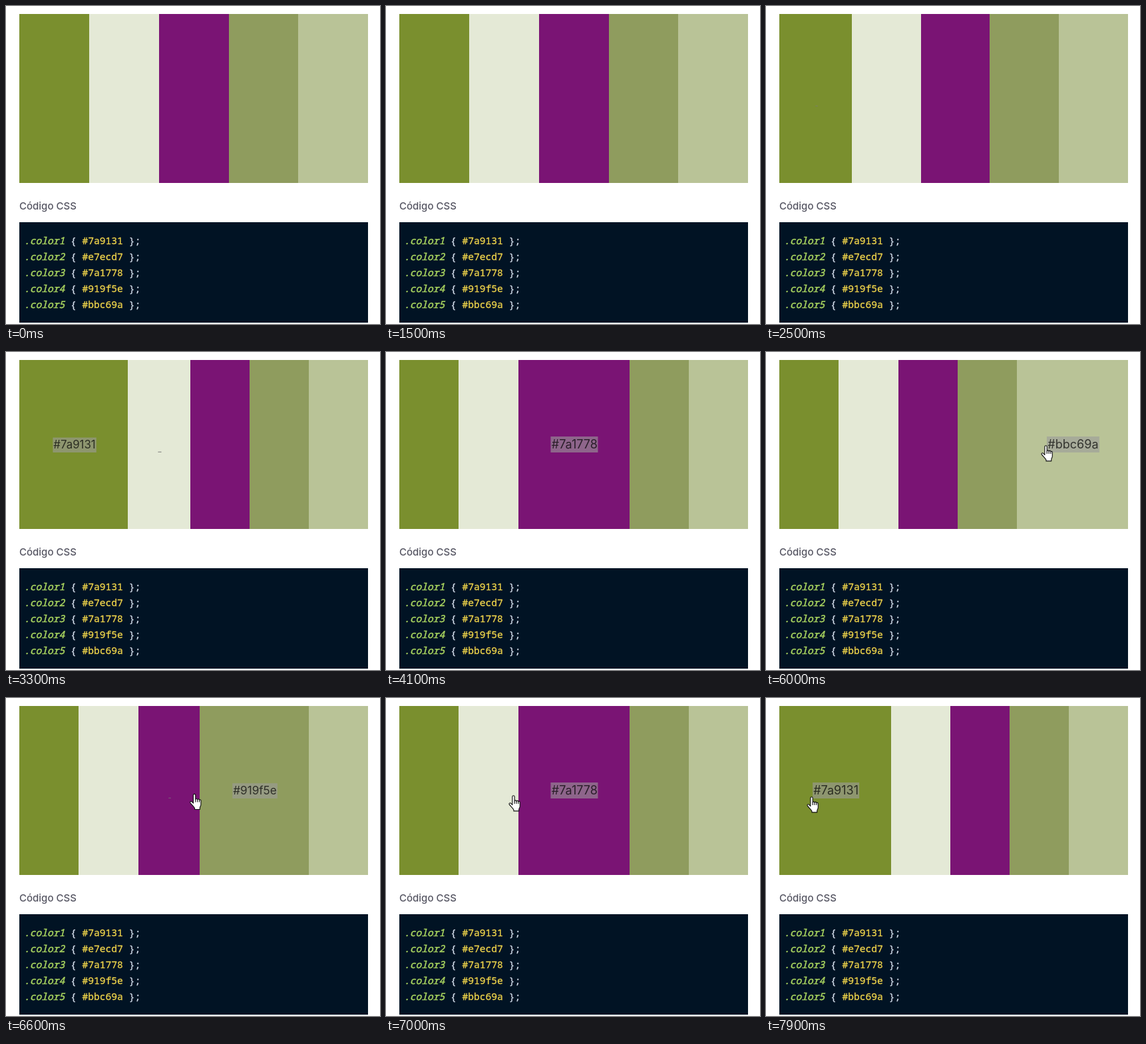
Write an HTML page that moves like this. It is 562x478 px and loops after 8 s.

```html
<!DOCTYPE html>
<html lang="es">
<head>
<meta charset="utf-8">
<style>
html, body { margin: 0; width: 100%; height: 100%; overflow: hidden; background: #fff; }
body { position: relative; }
body > * { position: absolute; }
#palette { left: 20.4px; top: 12px; width: 523.8px; height: 254px; display: flex; }
#palette div { flex: 1 1 0; min-width: 0; position: relative; }
#palette span { position: absolute; left: 50%; bottom: 115.5px; margin-left: 1px; padding: 0 1px;
  font: 18px/24px Inter, sans-serif; white-space: nowrap; color: rgba(0, 0, 0, .7);
  background: rgba(156, 156, 156, .6); transform-origin: 50% 100%; }
h2 { left: 20px; top: 289px; margin: 0; font: 500 15px/24px Inter, sans-serif; color: #555562; }
pre { left: 20px; top: 325px; width: 517px; height: 136px; margin: 0; padding: 15px 0 0 7px;
  font: 14.6px/24px "Noto Sans Mono", monospace; color: #d6deeb; background: #011324;
  -webkit-text-stroke: .3px; }
pre i { color: #a8d35f; -webkit-text-stroke: .5px; }
pre b { color: #f3d64b; font-weight: normal; }
#hand { left: 0; top: 0; fill: #fff; stroke: #111; stroke-width: 1.1; stroke-linejoin: round; }
</style>
</head>
<body>
<div id="palette"></div>
<h2>Código CSS</h2>
<pre></pre>
<svg id="hand" width="19" height="26" viewBox="0 0 18 25">
  <path d="M5.5 14V2.3a1.6 1.6 0 0 1 3.2 0V8.5a1.5 1.5 0 0 1 2.8.2a1.5 1.5 0 0 1 2.7.6a1.4 1.4 0 0 1 2.3 1.2V16c0 2-1.5 3-1.5 5V23H7.5V21.2C6 18.5 3.5 16.5 1.2 13.6C.2 12 2 10.6 3.4 11.8Z"/>
  <path d="M8.7 8.5V12.5M11.5 8.7V12.5M14.2 9.3V12.5"/>
</svg>
<script>
const LOOP = 8000, TICK = 100, EASE_MS = 200, GROW = 0.88;
const codes = ['#7a9131', '#e7ecd7', '#7a1778', '#919f5e', '#bbc69a'];
const fills = ['#7a8f2e', '#e4e9d6', '#7a1474', '#8f9c5e', '#b9c397'];
// [start time, panel that opens]
const opens = [[2487, 0], [3284, 1], [3887, 2], [4387, 3], [5087, 4],
  [6187, 3], [6587, 2], [7020, 1], [7587, 0]];
// [time, x, y]
const path = [[5800, 447, 145], [6000, 413, 140], [7000, 184, 146], [7900, 61, 148]];

const hand = document.getElementById('hand');
const palette = document.getElementById('palette');
document.querySelector('pre').innerHTML =
  codes.map((c, i) => `<i>.color${i + 1}</i> { <b>${c}</b> };`).join('\n');
palette.innerHTML = codes.map((c, i) =>
  `<div style="background:${fills[i]}"><span>${c}</span></div>`).join('');
const panels = [...palette.children];

const clamp = v => Math.min(1, Math.max(0, v));

// CSS "ease" curve: cubic-bezier(.25, .1, .25, 1)
function ease(x) {
  const bez = (a, b, s) => 3 * a * s * (1 - s) ** 2 + 3 * b * s * s * (1 - s) + s ** 3;
  let lo = 0, hi = 1;
  for (let n = 0; n < 20; n++) {
    const mid = (lo + hi) / 2;
    if (bez(.25, .25, mid) < x) lo = mid; else hi = mid;
  }
  return bez(.1, 1, hi);
}

function openness(t) {
  const open = [0, 0, 0, 0, 0];
  const k = opens.filter(o => o[0] <= t).length - 1;
  if (k < 0) return open;
  const x = clamp((t - opens[k][0]) / EASE_MS);
  const p = x < 1 ? ease(x) : 1;
  if (k > 0) open[opens[k - 1][1]] = 1 - p;
  open[opens[k][1]] = p;
  return open;
}

function moveHand(t) {
  hand.style.visibility = t < path[0][0] ? 'hidden' : 'visible';
  const k = Math.max(1, path.findIndex(p => p[0] >= t));
  const [t0, x0, y0] = path[k - 1], [t1, x1, y1] = path[k];
  const p = clamp((t - t0) / (t1 - t0));
  hand.style.transform = `translate(${x0 + (x1 - x0) * p}px, ${y0 + (y1 - y0) * p}px)`;
}

function draw(t) {
  openness(t).forEach((o, i) => {
    panels[i].style.flexGrow = 1 + GROW * o;
    panels[i].firstChild.style.transform = `translateX(-50%) scale(${o})`;
  });
  moveHand(t);
}

const start = performance.now();
function frame() {
  const t = (performance.now() - start) % LOOP;
  draw(Math.floor(t / TICK) * TICK);
  requestAnimationFrame(frame);
}
frame();
</script>
</body>
</html>
```
